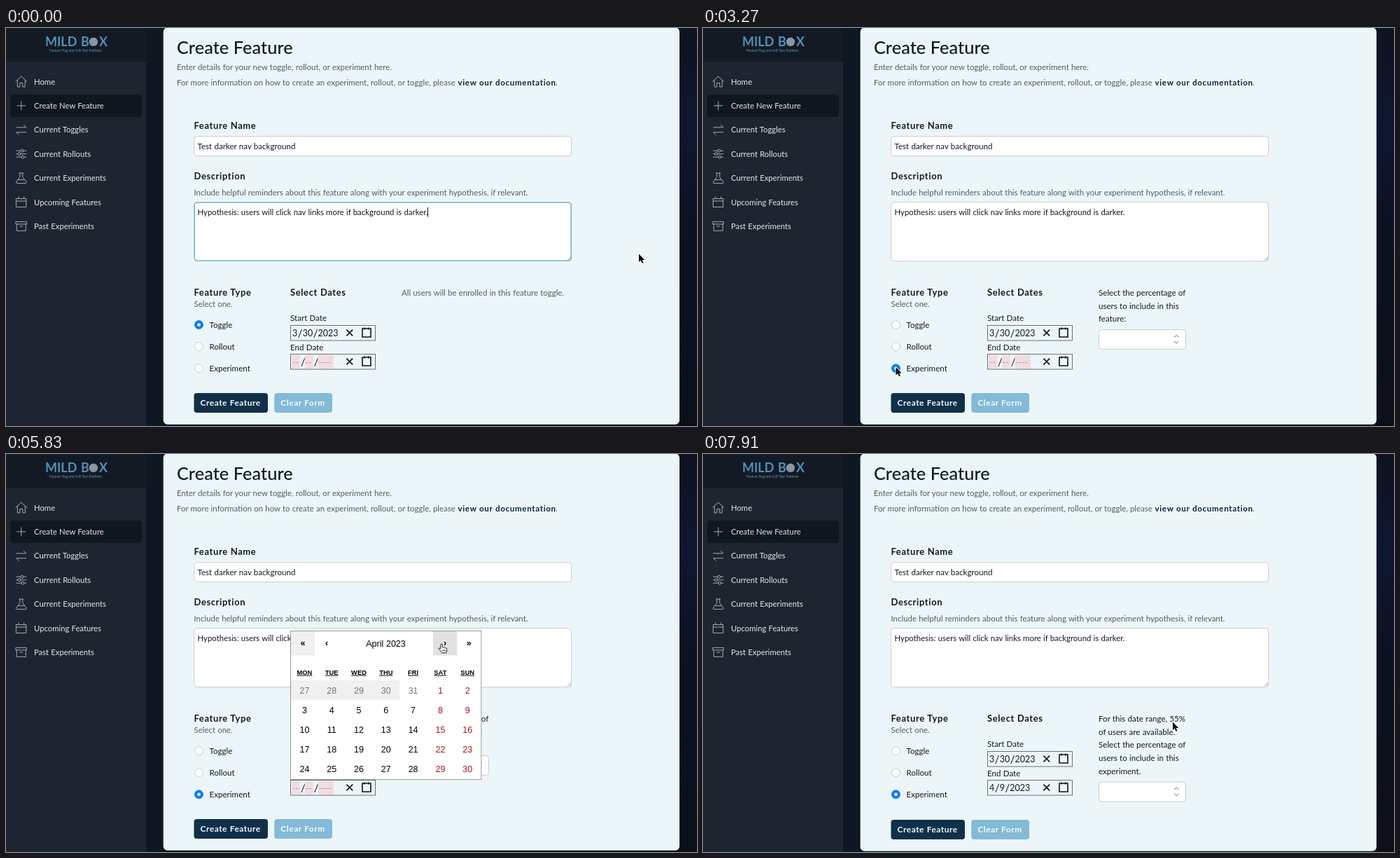
These frames come from a looping animation (987x568 px, 7990 ms). An HTML page:

```html
<!DOCTYPE html>
<html lang="en">
<head>
<meta charset="utf-8">
<title>Create Feature</title>
<style>
html, body { margin: 0; height: 100%; overflow: hidden; background: #0f1520; }
svg { display: block; width: 100vw; height: 100vh; }
text { font: 11.6px Lato, sans-serif; word-spacing: .25px; fill: #111a22; white-space: pre; }
.h1 { font-size: 25.4px; font-weight: 500; fill: #0d1a26; }
.h2 { font-size: 13px; font-weight: 700; letter-spacing: .6px; }
.hint { font-size: 11.45px; fill: #525d66; }
.area { font-size: 11.42px; }
.link { font-weight: 700; letter-spacing: .65px; fill: #0c2238; }
.nav { font-size: 11.3px; fill: #e2e6ea; }
.btn { font-size: 12px; font-weight: 700; letter-spacing: .5px; fill: #f4f9fb; }
.logo { font-size: 18px; font-weight: 700; fill: #4f90b8; }
.tag { font-size: 4.8px; fill: #5f97bb; }
.num { font-size: 12.5px; }
.slash { font-size: 15px; }
.dash { font-size: 12px; fill: #9a8f93; }
.cal text { font: 12.5px "Liberation Sans", Arial, sans-serif; fill: #000; text-anchor: middle; }
.cal .wd { font-size: 9.4px; font-weight: 700; text-decoration: underline; }
.cal .arrow { font-size: 12.5px; font-weight: 700; }
.cal .red { fill: #b5121f; }
.cal .dim { fill: #757575; }
.icon { fill: none; stroke: #a4abb5; stroke-linecap: round; stroke-linejoin: round; }
</style>
</head>
<body>
<svg viewBox="0 0 987 568" preserveAspectRatio="none">
  <defs>
    <linearGradient id="edge" x2="0" y2="1">
      <stop stop-color="#0d1320"/><stop offset=".25" stop-color="#0f1632"/>
      <stop offset=".5" stop-color="#0c1222"/><stop offset="1" stop-color="#0a0f18"/>
    </linearGradient>
  </defs>
  <g id="base"></g>
  <g id="live"></g>
</svg>
<script>
const LOOP = 7990;
const INK = '#111';
const base = document.getElementById('base');
const live = document.getElementById('live');

const text = (x, y, s, cls = '') => `<text x="${x}" y="${y}" class="${cls}">${s}</text>`;
const rect = (x, y, w, h, fill, stroke = 'none', r = 0, sw = 1) =>
  `<rect x="${x}" y="${y}" width="${w}" height="${h}" rx="${r}" fill="${fill}" stroke="${stroke}" stroke-width="${sw}"/>`;
const line = (d, stroke, sw = 1) => `<path d="${d}" fill="none" stroke="${stroke}" stroke-width="${sw}"/>`;

// Sidebar: label and icon path around its centre
const nav = [
  ['Home', 'M-8 0L0-7.5 8 0M-5.5-2V7.5H-2V2H2V7.5H5.5V-2'],
  ['Create New Feature', 'M-6 0H6M0-6V6'],
  ['Current Toggles', 'M-7-3.5H7L3.5-7M7 3.5H-7L-3.5 7'],
  ['Current Rollouts', 'M-7-4.5H-1M3-4.5H7M-7 0H-5M-1 0H7M-7 4.5H0M4 4.5H7M-1-4.5a2 2 0 1 0 4 0a2 2 0 1 0-4 0M-5 0a2 2 0 1 0 4 0a2 2 0 1 0-4 0M0 4.5a2 2 0 1 0 4 0a2 2 0 1 0-4 0'],
  ['Current Experiments', 'M-3-7H3M-2-7V-1.5L-7.5 6Q-7.5 7.5-6 7.5H6Q7.5 7.5 7.5 6L2-1.5V-7M-4.5 2.5H4.5'],
  ['Upcoming Features', 'M-7-5H7V7H-7ZM-7-1.5H7M-4-7.5V-5M4-7.5V-5'],
  ['Past Experiments', 'M-7.5-6.5H7.5V-3H-7.5ZM-6.5-3V6.5H6.5V-3M-2 0H2']
];

base.innerHTML =
  rect(0, 0, 987, 568, '#0f1722') + rect(962, 0, 25, 568, 'url(#edge)') +
  rect(0, 0, 200, 568, '#1e2430') + rect(0, 0, 200, 48.5, '#141a24') +
  rect(6, 95, 188, 32, '#11171f', 'none', 4) +
  text(56, 26, 'MILD', 'logo') + text(107, 26, 'B', 'logo') + text(133, 26, 'X', 'logo') +
  '<circle cx="125" cy="19.8" r="6.2" fill="#8798a2"/>' +
  text(62, 33.5, 'Feature Flag and A/B Test Platform', 'tag') +
  nav.map(([label, d], i) => {
    const y = 76.5 + i * 34.4;
    return `<path class="icon" transform="translate(21.8 ${y})" d="${d}"/>` + text(40, y + 4, label, 'nav');
  }).join('');

const field = (y, h, focus) => focus
  ? rect(269.2, y + 1, 538, h - 1, '#fff', '#76b1d0', 4, 1.6)
  : rect(268.6, y + .7, 539, h, '#fff', '#c6cdd2', 4);

const form =
  text(244, 37, 'Create Feature', 'h1') +
  text(244, 60.3, 'Enter details for your new toggle, rollout, or experiment here.', 'hint') +
  text(244, 82.3, 'For more information on how to create an experiment, rollout, or toggle, please', 'hint') +
  text(645.5, 82.3, 'view our documentation', 'link') + text(785, 82.3, '.', 'hint') +
  text(268.5, 144, 'Feature Name', 'h2') + field(154, 28) +
  text(273.5, 173, 'Test darker nav background') +
  text(268.5, 216, 'Description', 'h2') +
  text(268.5, 238.5, 'Include helpful reminders about this feature along with your experiment hypothesis, if relevant.', 'hint') +
  text(268.5, 381.5, 'Feature Type', 'h2') + text(268.5, 398, 'Select one.', 'hint') +
  text(406, 381.5, 'Select Dates', 'h2') + text(406, 418, 'Start Date') + text(406, 459.7, 'End Date');

function description(focus, caret) {
  return field(248, 84, focus) +
    text(273.5, 267, 'Hypothesis: users will click nav links more if background is darker.', 'area') +
    line('M802 331.5l5-5M805 331.5l2-2', '#777', .8) +
    (caret ? line('M602.5 256V269.5', INK) : '');
}

function radios(chosen, pressed) {
  return ['Toggle', 'Rollout', 'Experiment'].map((label, i) => {
    const y = 423.6 + i * 31.1, on = i === chosen;
    const fill = on ? '#0a7bff' : i === pressed ? '#dcdfe2' : '#fff';
    return `<circle cx="275.5" cy="${y}" r="6" fill="${fill}" stroke="${on ? fill : '#bfc5c9'}" stroke-width=".9"/>` +
      (on ? `<circle cx="275.5" cy="${y}" r="2.4" fill="#fff"/>` : '') + text(290.5, y + 4.1, label);
  }).join('');
}

// Month, day and year parts; an empty value shows dashes on pink
function dateBox(y, parts, hot) {
  let x = 409, s = rect(406.5, y + .5, 121, 21.5, 'none', '#6a7176');
  (parts || ['--', '--', '----']).forEach((p, i) => {
    if (i) { s += text(x + .6, y + 16.5, '/', 'slash'); x += 7.4; }
    const w = p.length * (parts ? 7.25 : 5.3);
    if (!parts) s += rect(x - 1, y + 1.5, w + 1.5, 19.5, '#f1dde1');
    s += text(x, y + 16, p, parts ? 'num' : 'dash');
    x += w + (parts ? 0 : .8);
  });
  const c = y + 11;
  return s + line(`M486.4 ${c - 4.4}l8.8 8.8m0-8.8l-8.8 8.8`, INK, 1.6) +
    line(`M509 ${c - 6}h12v12h-12zM512.2 ${c - 7.6}v3.2M517.8 ${c - 7.6}v3.2`, hot ? '#0078d7' : INK, 1.6);
}

function enrolment(lines, boxed) {
  const y = 430 + (lines.length - 3) * 18.8;
  return lines.map((s, i) => text(565, 381.7 + i * 18.8, s, boxed ? '' : 'hint')).join('') +
    (boxed ? rect(565.5, y + .5, 124, 28, '#fff', '#c6cdd2', 4) +
      line(`M673 ${y + 11.5}l3.3-3.2 3.3 3.2M673 ${y + 17}l3.3 3.2 3.3-3.2`, '#5c666d', 1) : '');
}

const buttons = y =>
  rect(268.5, y, 105.5, 28, '#10304a', 'none', 4) + text(277.5, y + 18.3, 'Create Feature', 'btn') +
  rect(383.3, y, 82.7, 28, '#83bad7', 'none', 4) + text(392.3, y + 18.3, 'Clear Form', 'btn');

// Calendar
const LEFT = 407, TOP = 323, CW = 38.8, CH = 28.15;
const months = [
  { name: 'March 2023', lead: 2, days: 31, before: 28, blocked: 32, back: 2 },
  { name: 'April 2023', lead: 5, days: 30, before: 31, blocked: 4, back: 1 }
];
const arrows = [['«', 407], ['‹', 441], ['›', 610], ['»', 644.3]];

// Box of the enabled calendar button under the pointer
function hovered(m, x, y) {
  if (y > 253 && y < 288) {
    const i = arrows.findIndex(a => x >= a[1] && x < a[1] + 34.3);
    return i >= m.back ? [arrows[i][1], 253, 34.3, 34.5] : null;
  }
  const col = Math.floor((x - LEFT) / CW), row = Math.floor((y - TOP) / CH);
  if (col < 0 || col > 6 || row < 0 || row > 4 || row * 7 + col < m.blocked) return null;
  return [LEFT + col * CW, TOP + row * CH, CW, CH];
}

function calendar(m, hover) {
  let s = rect(406.5, 252.5, 272.3, 212, '#fff', '#9a9d98') + rect(LEFT, 253, m.back * 34.3, 34.5, '#f0f0f0');
  for (let r = 0; r < 5; r++) {
    const n = Math.min(7, m.blocked - r * 7);
    if (n > 0) s += rect(LEFT, TOP + r * CH, n * CW, CH + .1, '#f0f0f0');
  }
  if (hover) s += rect(...hover, '#e1e1e1');
  s += text(542.5, 274.5, m.name);
  arrows.forEach(([c, x]) => s += text(x + 17, 274.3, c, 'arrow'));
  ['MON', 'TUE', 'WED', 'THU', 'FRI', 'SAT', 'SUN'].forEach((d, i) => s += text(LEFT + (i + .5) * CW, 314.7, d, 'wd'));
  for (let i = 0; i < 35; i++) {
    const n = i - m.lead + 1, out = n < 1 || n > m.days;
    const day = n < 1 ? n + m.before : n > m.days ? n - m.days : n;
    s += text(LEFT + (i % 7 + .5) * CW, TOP + Math.floor(i / 7) * CH + 18.6, day, out ? 'dim' : i % 7 > 4 ? 'red' : '');
  }
  return `<g class="cal">${s}</g>`;
}

// Pointer moves: start, end, target x and y, optional bend point
const moves = [
  [30, 500, 447, 430], [780, 1570, 271, 481], [1570, 1730, 275.5, 484],
  [3340, 4020, 514, 472], [4020, 4100, 515, 473], [4700, 5500, 622, 272, 813, 291],
  [5500, 5660, 622, 271], [6090, 6830, 655, 369], [7500, 7910, 671, 382.5]
];

function pointer(t) {
  let x = 904, y = 322.5;
  for (const [a, b, tx, ty, bx = (x + tx) / 2, by = (y + ty) / 2] of moves) {
    if (t < a) break;
    const u = Math.min(1, (t - a) / (b - a)), k = u * u * (3 - 2 * u);
    const bend = (p, q, r) => p * (1 - k) ** 2 + 2 * q * k * (1 - k) + r * k * k;
    [x, y] = [bend(x, bx, tx), bend(y, by, ty)];
  }
  return [x, y];
}

const arrowShape = '<path d="M0 0V11.5L2.7 9.1 4.5 13.2 6.4 12.4 4.7 8.4H8.2Z" fill="#000" stroke="#fff" stroke-width="1.4" paint-order="stroke"/>';
const handShape = '<path d="M-1.2 7V1.2a1.2 1.2 0 0 1 2.4 0V5q1.2-.9 2.2.4 1.2-.8 2.1.5 2.2-.5 2.2 1.6V9q0 2-1 3.8H.6Q-.4 11-2 9.3T-4.2 6.6Q-3.5 5-1.2 7ZM1.8 8.5v2M3.6 8.5v2M5.4 8.5v2" fill="#fff" stroke="#111" stroke-width=".9" stroke-linejoin="round"/>';

function draw(t) {
  const [x, y] = pointer(t);
  const focus = t < 1990, picked = t >= 2240, open = t >= 4350 && t < 7080, done = t >= 7080;
  const caret = focus && !(t >= 420 && t < 900) && !(t >= 1400 && t < 1720);
  const month = months[t < 5830 ? 0 : 1];
  const hover = open && hovered(month, x, y);
  const onIcon = x > 503 && x < 527 && y > 466 && y < 487;
  const share = ['Select the percentage of', 'users to include in this'];
  const lines = done ? ['For this date range, 55%', 'of users are available.', ...share, 'experiment.']
    : picked ? [...share, 'feature:'] : ['All users will be enrolled in this feature toggle.'];

  live.innerHTML = rect(224.7, -.5, 737.3, done ? 567.2 : 566.2, '#ecf6f8', 'none', 6) + form +
    description(focus, caret) + radios(picked ? 2 : 0, focus ? -1 : 2) +
    dateBox(424, ['3', '30', '2023']) + dateBox(465, done ? ['4', '9', '2023'] : null, onIcon) +
    enrolment(lines, picked) + buttons(done ? 522 : 521) +
    (open ? calendar(month, hover) : '') +
    `<g transform="translate(${x} ${y})">${hover || onIcon ? handShape : arrowShape}</g>`;
}

const start = performance.now();
function tick() {
  draw((performance.now() - start) % LOOP);
  requestAnimationFrame(tick);
}
tick();
</script>
</body>
</html>
```
